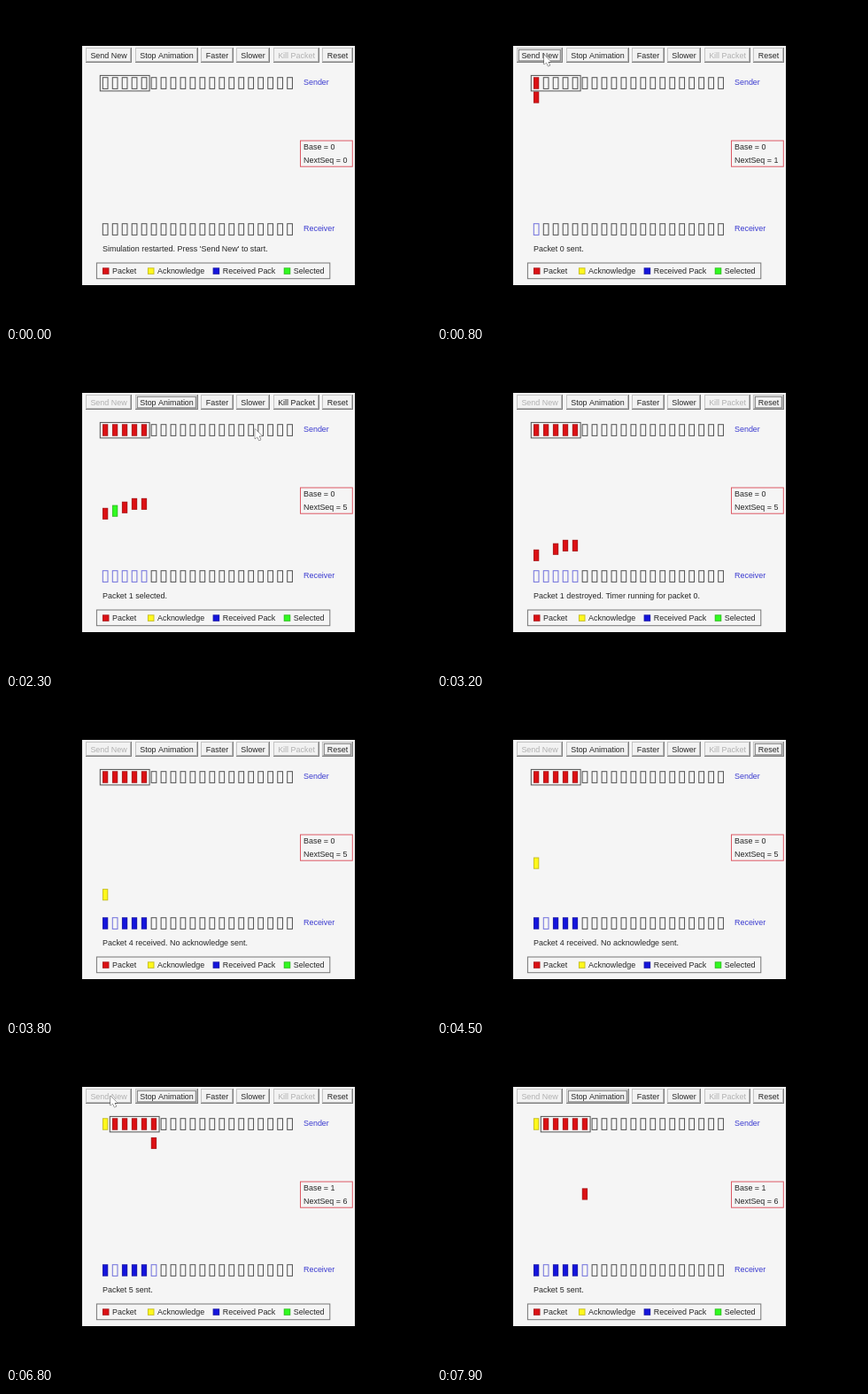
An HTML page with a canvas for the animation above (8000 ms loop, 480 by 360 pixels).

```html
<!DOCTYPE html>
<html>
<head>
<meta charset="utf-8">
<style>
html, body { margin: 0; height: 100%; overflow: hidden; background: #000; }
canvas { display: block; }
</style>
</head>
<body>
<canvas id="stage" width="480" height="360"></canvas>
<script>
const ctx = document.getElementById('stage').getContext('2d');
const LOOP = 8000, SPEED = 0.0522, ACK_SPEED = 0.0508;
const RED = '#dc1014', YELLOW = '#fff81c', BLUE = '#1414dc', GREEN = '#30fa20';
const INK = '#262626', LINE = '#505050', LABEL = '#3c3cd0';
const SENDER_Y = 87, RECEIVER_Y = 252, START_Y = 103, END_Y = 239;
const SENT = [800, 860, 935, 1010, 1010, 6695];
const SELECT = 1880, KILL = 2620, ACK_START = 3480, ACK_END = 6153;
const LOST = 1;
const arrival = i => i === LOST ? Infinity : SENT[i] + (END_Y - START_Y) / SPEED;

// Status line: each text holds until the next one starts.
const MESSAGES = [
  [0, "Simulation restarted. Press 'Send New' to start."],
  ...SENT.slice(0, 5).map((t, i) => [t, `Packet ${i} sent.`]),
  [SELECT, 'Packet 1 selected.'],
  [KILL, 'Packet 1 destroyed. Timer running for packet 0.'],
  [arrival(0), 'Packet 0 received. Acknowledge sent.'],
  ...[2, 3, 4].map(i => [arrival(i), `Packet ${i} received. No acknowledge sent.`]),
  [ACK_END, 'Packet 0 acknowledged. Timer running for packet 1.'],
  [SENT[5], 'Packet 5 sent.']
];

// Pointer tip: time, x, y
const POINTER = [
  [350, 135, 28], [650, 121, 55], [1350, 121, 55], [1840, 122, 154],
  [1920, 122, 156], [2300, 281, 86], [2450, 322, 55], [2680, 322, 55],
  [2850, 340, 28], [6300, 110, 28], [6550, 118, 55], [6850, 118, 55], [7050, 112, 28]
];
const pointerShape = new Path2D('M0 0V11L2.6 8.7L4.6 13L6.5 12.1L4.6 8H8Z');

function fill(x, y, w, h, color) {
  ctx.fillStyle = color;
  ctx.fillRect(x, y, w, h);
}

// The coordinates run along the middle of the line.
function frame(x, y, w, h, color) {
  ctx.strokeStyle = color;
  ctx.lineWidth = 1;
  ctx.strokeRect(x, y, w, h);
}

function block(x, y, w, h, color) {
  fill(x, y, w, h, color);
  frame(x + 0.4, y + 0.4, w - 0.8, h - 0.8, 'rgba(60, 50, 50, 0.28)');
}

function text(s, x, y, color = INK) {
  ctx.fillStyle = color;
  ctx.fillText(s, x, y);
}

function button(label, x, w, enabled, focused) {
  fill(x, 47, w, 17, '#808080');
  fill(x, 47, w - 1, 16, '#c4c4c4');
  fill(x + 1, 48, w - 2, 15, '#f2f2f2');
  fill(x + w - 2, 48, 1, 15, '#b8b8b8');
  fill(x + 1, 62, w - 2, 1, '#b8b8b8');
  if (focused) frame(x + 2.3, 49.3, w - 5, 12.6, '#777');
  ctx.textAlign = 'center';
  text(label, x + w / 2, 59.4, enabled ? INK : '#b0b0b0');
  ctx.textAlign = 'left';
}

const slotX = i => 109 + 10.97 * i;

function slot(i, y, color, outline) {
  if (color) block(slotX(i), y - 6.7, 6.2, 13.4, color);
  else frame(slotX(i) + 0.3, y - 6.3, 5.7, 12.7, outline);
}

function packet(i, y, color) {
  block(slotX(i), y - 6.5, 6.2, 13, color);
}

function drawPointer(t) {
  const k = POINTER.findIndex(p => p[0] > t);
  if (k < 1) return;
  const a = POINTER[k - 1], b = POINTER[k];
  const u = (t - a[0]) / (b[0] - a[0]);
  ctx.save();
  ctx.translate(a[1] + (b[1] - a[1]) * u, a[2] + (b[2] - a[2]) * u);
  ctx.fillStyle = '#fff';
  ctx.strokeStyle = '#444';
  ctx.stroke(pointerShape);
  ctx.fill(pointerShape);
  ctx.restore();
}

function draw(t) {
  const acked = t >= ACK_END;
  const base = acked ? 1 : 0;
  const next = SENT.filter(s => t >= s).length;
  const canSend = next < base + 5;
  const canKill = t >= SELECT && t < KILL;

  fill(0, 0, 480, 360, '#000');
  ctx.save();
  ctx.beginPath();
  ctx.rect(86, 45, 308, 270);
  ctx.clip();
  fill(86, 45, 308, 270, '#f5f5f5');
  ctx.font = '8.95px "Liberation Sans", Arial, sans-serif';

  let focus = '';
  if (t >= SENT[0]) focus = 'Send New';
  if (t >= SENT[4]) focus = 'Stop Animation';
  if (t >= KILL) focus = 'Reset';
  if (t >= SENT[5]) focus = 'Stop Animation';
  for (const [label, x, w, enabled = true] of [
    ['Send New', 90, 52, canSend], ['Stop Animation', 146, 71], ['Faster', 220, 37],
    ['Slower', 260, 38], ['Kill Packet', 302, 52, canKill], ['Reset', 357, 35]
  ]) button(label, x, w, enabled, label === focus);

  for (let i = 0; i < 20; i++) {
    const sent = i < next;
    const received = sent && t >= arrival(i);
    slot(i, SENDER_Y, i < base ? YELLOW : sent && RED, LINE);
    slot(i, RECEIVER_Y, received && BLUE, sent ? '#7070dc' : LINE);
    if (sent && !received && !(i === LOST && t >= KILL))
      packet(i, START_Y + (t - SENT[i]) * SPEED, i === LOST && canKill ? GREEN : RED);
  }
  frame(106.3 + 10.97 * base, 78.4, 55.8, 17.5, LINE);

  if (t >= ACK_START && !acked)
    packet(0, 236 - (t - ACK_START) * ACK_SPEED, YELLOW);

  text('Sender', 336, 89, LABEL);
  text('Receiver', 336, 254, LABEL);
  frame(332.5, 152, 58.8, 29.2, '#dc5864');
  text('Base = ' + base, 336, 162.4);
  text('NextSeq = ' + next, 336, 177);
  text(MESSAGES.filter(m => t >= m[0]).pop()[1], 109, 276.6);

  frame(102.4, 290, 263.4, 17.7, '#777');
  for (const [label, x, color] of [
    ['Packet', 109, RED], ['Acknowledge', 160, YELLOW],
    ['Received Pack', 233.7, BLUE], ['Selected', 313.8, GREEN]
  ]) {
    block(x, 295.4, 7.4, 7.4, color);
    text(label, x + 11, 302.2);
  }
  drawPointer(t);
  ctx.restore();
}

const begin = performance.now();
function tick() {
  draw((performance.now() - begin) % LOOP);
  requestAnimationFrame(tick);
}
tick();
</script>
</body>
</html>
```
